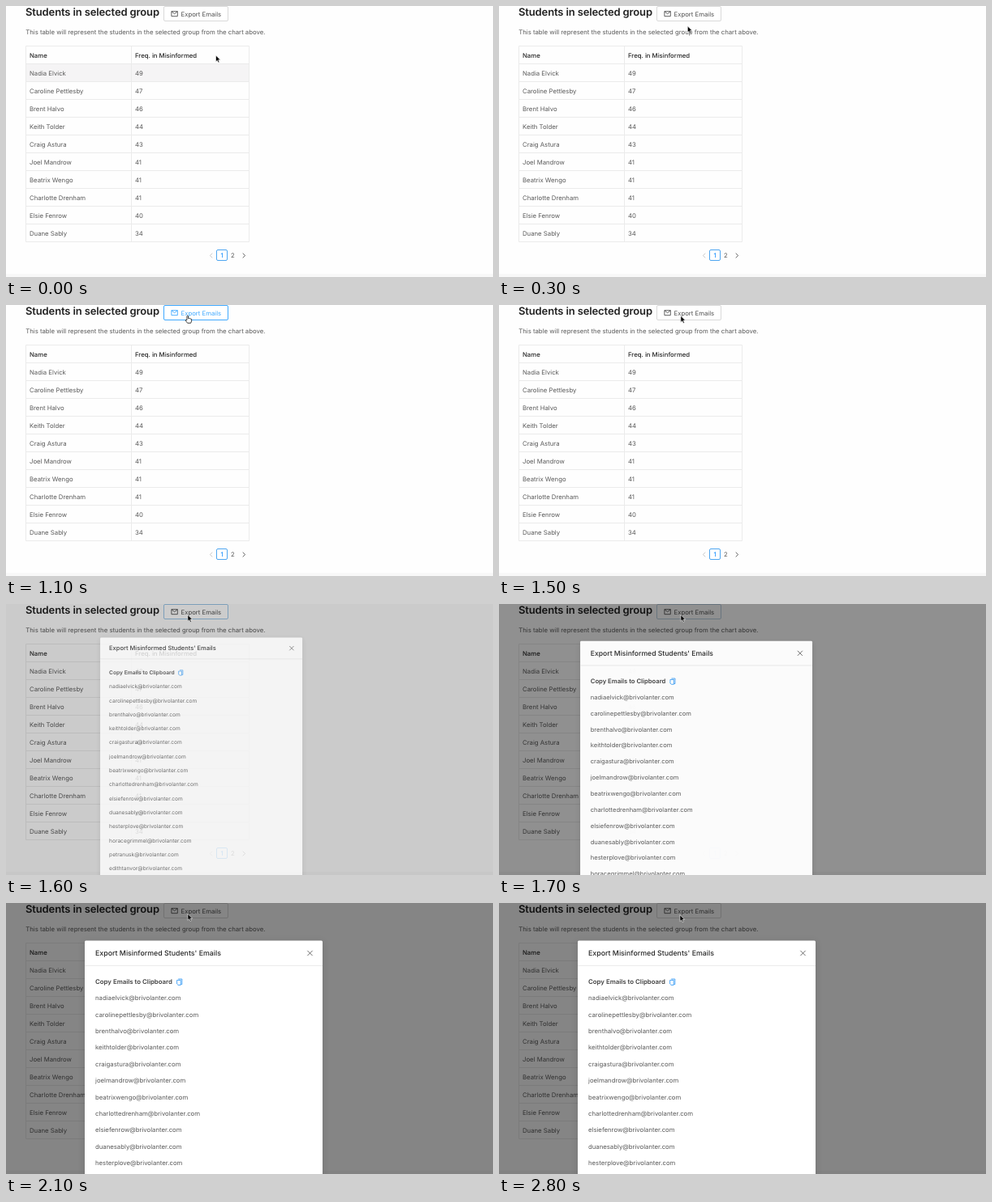
Write an HTML page that moves like this. It is 600x335 px and loops after 2.9 s.

```html
<!DOCTYPE html>
<html lang="en">
<head>
<meta charset="utf-8">
<title>Export emails</title>
<style>
  html, body { margin: 0; height: 100%; overflow: hidden; background: #fefefe; }
  svg { display: block; width: 100vw; height: 100vh; }
  text { font: 7.75px Inter, Roboto, sans-serif; fill: #595959; text-rendering: geometricPrecision; }
  .dark { fill: #262626; font-weight: 500; }
  .strong { font-size: 7.85px; fill: #404040; font-weight: 600; }
  .h2 { font-size: 13px; font-weight: 600; letter-spacing: -.13px; fill: #222; }
  .title { font-size: 8.8px; }
  .mid { text-anchor: middle; }
  .line { fill: none; stroke: #ebebeb; }
  .icon { fill: none; stroke-width: .9; }
  #sheet { filter: drop-shadow(0 2px 4px rgba(0, 0, 0, .12)); }
</style>
</head>
<body>
<svg viewBox="0 0 600 335">
  <rect y="331" width="600" height="4" fill="#f8f8f8"/>
  <text class="h2" x="24" y="12.4">Students in selected group</text>
  <g id="button">
    <rect id="frame" x="194.5" y=".5" width="79" height="18" rx="1.5" fill="#fff"/>
    <path id="mail" class="icon" d="M203.9 6.7h7.4v6h-7.4zl3.7 3 3.7-3"/>
    <text id="label" x="215.5" y="12.6">Export Emails</text>
  </g>
  <text x="24.2" y="34.6">This table will represent the students in the selected group from the chart above.</text>

  <rect id="hover" x="25" y="72" width="274" height="21" fill="#f5f4f5"/>
  <g id="table">
    <text class="dark" x="29" y="63.5">Name</text>
    <text class="dark" x="159" y="63.5">Freq. in Misinformed</text>
  </g>

  <path class="icon" stroke="#c4c4c4" d="M254.3 305.7l-3 2.8 3 2.8"/>
  <rect x="259.5" y="301.5" width="13" height="13" rx="1.5" fill="#fff" stroke="#4fa6f0"/>
  <text class="mid" x="266" y="311" style="fill:#1890ff;font-weight:500">1</text>
  <text class="mid" x="279.3" y="311">2</text>
  <path class="icon" stroke="#595959" d="M291.7 305.7l3 2.8-3 2.8"/>

  <rect id="mask" width="600" height="335"/>
  <g id="modal">
    <rect id="sheet" x="97" y="46.5" width="293" height="420" rx="1.5" fill="#fff"/>
    <path class="line" d="M97 77.5h293"/>
    <text class="dark title" x="110" y="65.2">Export Misinformed Students' Emails</text>
    <path class="icon" stroke="#5c5c5c" d="M371.4 58.9l6.2 6.2m0-6.2l-6.2 6.2"/>
    <text class="strong" x="110" y="100.2">Copy Emails to Clipboard</text>
    <path class="icon" stroke="#3b9df5" fill="#d4e9fc" d="M212.2 94h4.6v6.6h-1.4"/>
    <path class="icon" stroke="#3b9df5" fill="#d4e9fc" d="M210.6 95.4h4.6v6h-3.2l-1.4-1.4z"/>
  </g>

  <g id="cursor" stroke-linejoin="round">
    <path id="arrow" fill="#000" stroke="#fff" stroke-width=".6"
      d="M0 0v8l1.8-1.7 1.3 2.8 1.4-.6-1.3-2.8h2.5z"/>
    <path id="hand" fill="#fff" stroke="#111" stroke-width=".8"
      d="M-.8 5.6V.7q.8-1.2 1.6 0v3q.8-.7 1.5.1.8-.5 1.4.3 1-.3 1.2.8v2l-.9 2.4H-.1l-2.5-3.3q.2-1.2 1.8-.4z"/>
  </g>
</svg>
<script>
const $ = id => document.getElementById(id);
const LOOP = 2900, STEP = 100;
const students = [
  ["Nadia Elvick", 49], ["Caroline Pettlesby", 47], ["Brent Halvo", 46], ["Keith Tolder", 44],
  ["Craig Astura", 43], ["Joel Mandrow", 41], ["Beatrix Wengo", 41], ["Charlotte Drenham", 41],
  ["Elsie Fenrow", 40], ["Duane Sably", 34], ["Hester Plove"], ["Horace Grimmel"],
  ["Petra Nusk"], ["Edith Tanvor"]
];

function add(parent, tag, attrs, text = "") {
  const el = document.createElementNS("http://www.w3.org/2000/svg", tag);
  for (const key in attrs) el.setAttribute(key, attrs[key]);
  el.textContent = text;
  parent.append(el);
}

let grid = "M24.5 49.5h275v242h-275zM154.5 49.5v242";
students.forEach(([name, count], i) => {
  const email = name.toLowerCase().replace(" ", "") + "@brivolanter.com";
  add($("modal"), "text", { x: 110, y: 120.4 + 20.35 * i }, email);
  if (!count) return;
  const y = 85.6 + 22 * i;
  add($("table"), "text", { x: 29, y }, name);
  add($("table"), "text", { x: 159, y }, count);
  grid += `M24.5 ${71.5 + 22 * i}h275`;
});
add($("table"), "path", { class: "line", d: grid });

const ramp = (t, a, b) => Math.min(1, Math.max(0, (t - a) / (b - a)));
const lerp = (a, b, p) => a + (b - a) * p;
const BLUE = [64, 169, 255];
const tint = (grey, p) => `rgb(${BLUE.map(c => lerp(grey, c, p))})`;

function draw(t) {
  // Pointer: glide to the button, settle, then drift slightly
  const glide = 1 - (1 - ramp(t, 0, 600)) ** 2;
  const settle = ramp(t, 900, 1500), drift = ramp(t, 2500, 2800);
  const x = lerp(258.5, 223.6, glide) + .3 * settle - drift;
  const y = lerp(61, 12.8, glide) + .6 * settle + 1.3 * drift;
  const pointing = t >= 400 && t < 1500;
  $("cursor").setAttribute("transform", `translate(${x} ${y})`);
  $("hand").style.display = pointing ? "" : "none";
  $("arrow").style.display = pointing ? "none" : "";
  $("hover").style.opacity = 1 - ramp(t, 0, 300);

  // Button: hover colour, then a fading focus border
  const hot = ramp(t, 300, 600) - ramp(t, 1200, 1500);
  const focus = t >= 1600 ? .4 * (1 - ramp(t, 1600, 1800)) : 0;
  $("label").style.fill = $("mail").style.stroke = tint(80, hot);
  $("frame").style.stroke = tint(217, Math.max(hot, focus));

  // Dialog zooms out of the click point
  const open = t >= 1600, rest = (1 - ramp(t, 1600, 1800)) ** 2.64;
  const scale = 1 - .15 * rest;
  $("mask").style.opacity = open ? .48 * (1 - .58 * rest) : 0;
  $("modal").style.opacity = open ? 1 - .2 * rest : 0;
  $("modal").setAttribute("transform", `translate(224 13) scale(${scale}) translate(-224 -13)`);
}

const start = performance.now();
function tick() {
  const t = (performance.now() - start) % LOOP;
  draw(Math.floor(t / STEP) * STEP);
  requestAnimationFrame(tick);
}
tick();
</script>
</body>
</html>
```
